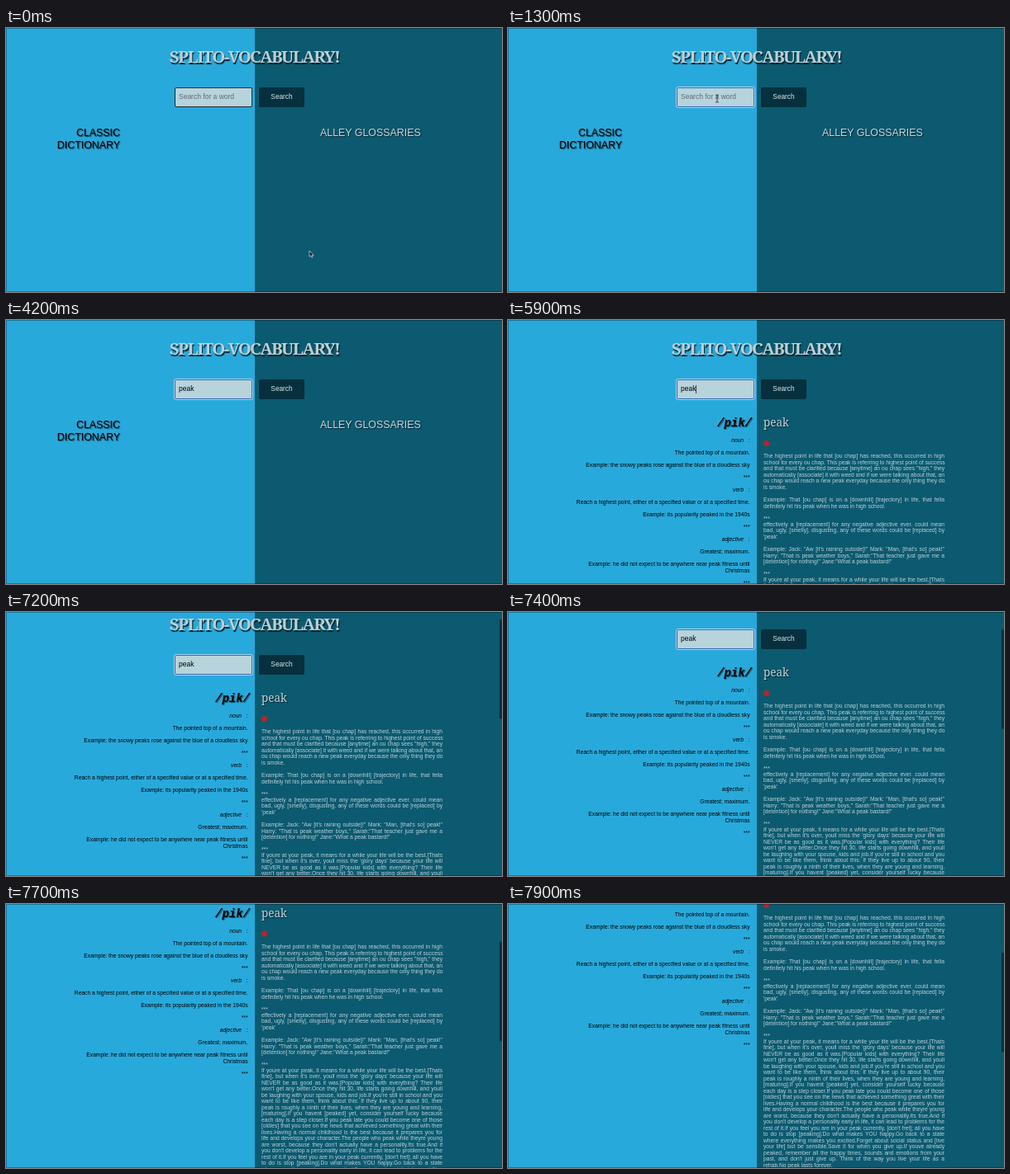
An HTML page that plays this animation: 600x320 px, repeating every 8 s.

```html
<!DOCTYPE html>
<html lang="en">
<head>
<meta charset="utf-8">
<title>Two-sided word search</title>
<style>
  html, body { margin: 0; width: 100%; height: 100%; overflow: hidden; }
  #stage {
    position: relative; width: 600px; height: 320px; overflow: hidden;
    background: linear-gradient(90deg, #28a9db 301px, #0c5a70 301px);
    font-family: "Liberation Sans", Arial, sans-serif;
  }
  #stage div, #stage svg { position: absolute; white-space: pre; }
  #page, #heads, #results { inset: 0; }
  #edge { inset: 0; border: solid rgba(0, 0, 0, .3); border-width: 1px 0 1px 1px; }
  #title {
    left: 0; width: 601px; top: 20px; text-align: center;
    font: bold 20.5px/28px "Noto Serif", serif; letter-spacing: -1.65px;
    color: #bccfd6; text-shadow: 1px 1.5px 1px #06222c;
  }
  #box {
    left: 204px; top: 72px; width: 94px; height: 23.5px; box-sizing: border-box;
    border: 1.5px solid #1d2a30; border-radius: 2px; background: #b7d3db;
    font-size: 8.5px; line-height: 21px;
  }
  #box.focus { border-color: #3569b4; outline: 1px solid #a9d6ec; }
  #word, #hint { left: 4px; top: 0; }
  #word { color: #000; }
  #hint { color: #5d6b71; }
  #caret { left: 100%; top: 5.5px; width: 1px; height: 10px; background: #444; }
  #button {
    left: 306px; top: 72px; width: 55px; height: 24px; border-radius: 2px;
    background: #06303d; color: #dbe6ea; text-align: center; font-size: 8.3px; line-height: 23px;
  }
  .head { top: 120px; font-size: 12.4px; line-height: 14.5px; }
  #classic { right: 462px; text-align: right; color: #000; text-shadow: 1px 1px 1px #134a5e; }
  #street { left: 380px; color: #c8d8de; text-shadow: 1px 1px 1px #06222c; }
  #sound {
    right: 305px; top: 116px; text-align: right; color: #000; text-shadow: 1px 1px 1px #134a5e;
    font: italic bold 14px/18px "Liberation Mono", monospace;
  }
  #entry {
    left: 309px; top: 115px; color: #c2d3d9; text-shadow: 1px 1px 1px #06222c;
    font: 13.5px/18px "Noto Serif", serif;
  }
  #dot { left: 309px; top: 145.5px; width: 7px; height: 7px; border-radius: 50%; background: #b3262b; }
  .row { font-size: 6.7px; line-height: 7.5px; height: 7.5px; }
  .left { right: 307.5px; text-align: right; color: #000; }
  .kind { font-style: italic; }
  .right { left: 309px; width: 219px; color: #bdd0d7; }
  .full { text-align-last: justify; }
  #stage .full { white-space: nowrap; }
  #bar { left: 596.5px; top: 1px; width: 3px; height: 121px; border-radius: 2px; background: #06303d; }
</style>
</head>
<body>
<div id="stage">
  <div id="page">
    <div id="title">SPLITO-VOCABULARY!</div>
    <div id="box"><div id="hint">Search for a word</div><div id="word"><span id="typed"></span><div id="caret"></div></div></div>
    <div id="button">Search</div>
    <div id="heads">
      <div id="classic" class="head">CLASSIC
DICTIONARY</div>
      <div id="street" class="head">ALLEY GLOSSARIES</div>
    </div>
    <div id="results">
      <div id="sound">/pik/</div>
      <div id="entry">peak</div>
      <div id="dot"></div>
    </div>
  </div>
  <div id="bar"></div>
  <svg id="arrow" width="8" height="11" viewBox="0 0 8 11"><path d="M1 1V8.2L2.7 6.7L3.8 9.2L5 8.7L3.9 6.3H6Z" fill="#111" stroke="#fff" stroke-width=".6"/></svg>
  <svg id="beam" width="6" height="11" viewBox="0 0 6 11"><path d="M1 .8Q3 .8 3 2V9Q3 10.2 1 10.2M5 .8Q3 .8 3 2M3 9Q3 10.2 5 10.2" fill="none" stroke="#222" stroke-width=".8"/></svg>
  <div id="edge"></div>
</div>
<script>
const LOOP = 8000, LINE = 7.5;
const $ = id => document.getElementById(id);

function row(y, text, cls) {
  const el = document.createElement('div');
  el.className = 'row ' + cls;
  el.style.top = y - LINE / 2 + 'px';
  el.textContent = text;
  $('results').append(el);
}

// Justified paragraph: every line but the last fills the column.
function para(y, text) {
  const lines = text.trim().split('\n');
  lines.forEach((s, i) => row(y + i * LINE, s, i < lines.length - 1 ? 'right full' : 'right'));
}

function sense(y, kind, meaning, example) {
  row(y, kind + '   :', 'left kind');
  row(y + 15, meaning, 'left');
  const lines = example.split('\n');
  lines.forEach((s, i) => row(y + 30 + i * LINE, s, 'left'));
  row(y + 45 + (lines.length - 1) * LINE, '***', 'left');
}

sense(146, 'noun', 'The pointed top of a mountain.',
  'Example: the snowy peaks rose against the blue of a cloudless sky');
sense(206, 'verb', 'Reach a highest point, either of a specified value or at a specified time.',
  'Example: its popularity peaked in the 1940s');
sense(266, 'adjective', 'Greatest; maximum.',
  'Example: he did not expect to be anywhere near peak fitness until\nChristmas');

para(165, `
The highest point in life that [ou chap] has reached, this occurred in high
school for every ou chap. This peak is referring to highest point of success
and that must be clarified because [anytime] an ou chap sees "high," they
automatically [associate] it with weed and if we were talking about that, an
ou chap would reach a new peak everyday because the only thing they do
is smoke.`);
para(218, `
Example: That [ou chap] is on a [downhill] [trajectory] in life, that fella
definitely hit his peak when he was in high school.`);
para(240.5, '***');
para(247.5, `
effectively a [replacement] for any negative adjective ever. could mean
bad, ugly, [smelly], disgusting, any of these words could be [replaced] by
'peak'`);
para(278, `
Example: Jack: "Aw [it's raining outside]!" Mark: "Man, [that's so] peak!"
Harry: "That is peak weather boys," Sarah:"That teacher just gave me a
[detention] for nothing!" Jane:"What a peak bastard!"`);
para(307.5, '***');
para(314.5, `
If youre at your peak, it means for a while your life will be the best.[Thats
fine], but when it's over, youll miss the 'glory days' because your life will
NEVER be as good as it was.[Popular kids] with everything? Their life
won't get any better.Once they hit 30, life starts going downhill, and youll
be laughing with your spouse, kids and job.If you're still in school and you
want to be like them, think about this: If they live up to about 90, their
peak is roughly a ninth of their lives, when they are young and learning,
[maturing].If you havent [peaked] yet, consider yourself lucky because
each day is a step closer.If you peak late you could become one of those
[oldies] that you see on the news that achieved something great with their
lives.Having a normal childhood is the best because it prepares you for
life and develops your character.The people who peak while theyre young
are worst, because they don't actually have a personality.Its true.And if
you don't develop a personality early in life, it can lead to problems for the
rest of it.If you feel you are in your peak currently, [don't fret]; all you have
to do is stop [peaking].Do what makes YOU happy.Go back to a state
where everything makes you excited.Forget about social status and [live
your life] but be sensible.Save it for when you give up.If youve already
peaked, remember all the happy times, sounds and emotions from your
past, and don't just give up. Think of the way you live your life as a
rehab.No peak lasts forever.`);

// Scroll stops: time, offset, speed in px per ms.
const stops = [[6600, 0, 0], [7200, 20, .1], [7500, 72, .22], [7900, 148, .15], [8000, 161, .11]];

function scrollAt(t) {
  const i = stops.findIndex(s => t < s[0]);
  if (i < 1) return 0;
  const [t0, a, va] = stops[i - 1], [t1, b, vb] = stops[i];
  const d = t1 - t0, u = (t - t0) / d, w = 1 - u;
  return a * (1 + 2 * u) * w * w + va * d * u * w * w + b * u * u * (3 - 2 * u) - vb * d * u * u * w;
}

const show = (id, on) => $(id).style.display = on ? '' : 'none';
const move = (id, x, y) => $(id).style.transform = `translate(${x}px,${y}px)`;

function draw(t) {
  const u = Math.min(1, Math.max(0, (t - 50) / 650)), e = u * u * (3 - 2 * u);
  const x = 366 - 116 * e + 60 * e * (1 - e), y = 269 - 189 * e;
  const focus = t >= 900, overBox = x < 297 && y < 92;
  const typed = [1800, 1900, 2050, 2200].filter(k => t >= k).length;
  const blink = (t + 400) % 1000 < 500;

  move('arrow', x, y);
  move('beam', x, y);
  show('arrow', typed === 0 && !overBox);
  show('beam', typed === 0 && overBox);

  $('box').className = focus ? 'focus' : '';
  $('typed').textContent = 'peak'.slice(0, typed);
  show('hint', typed === 0);
  show('caret', focus && (blink || t >= 1800 && t < 2600));

  show('heads', t < 4800);
  show('results', t >= 4800);

  const s = scrollAt(t);
  move('page', 0, -s);
  move('bar', 0, s * .39);
  show('bar', t >= 6600);
}

let start;
function tick(now) {
  start ??= now;
  draw((now - start) % LOOP);
  requestAnimationFrame(tick);
}
draw(0);
requestAnimationFrame(tick);
</script>
</body>
</html>
```
